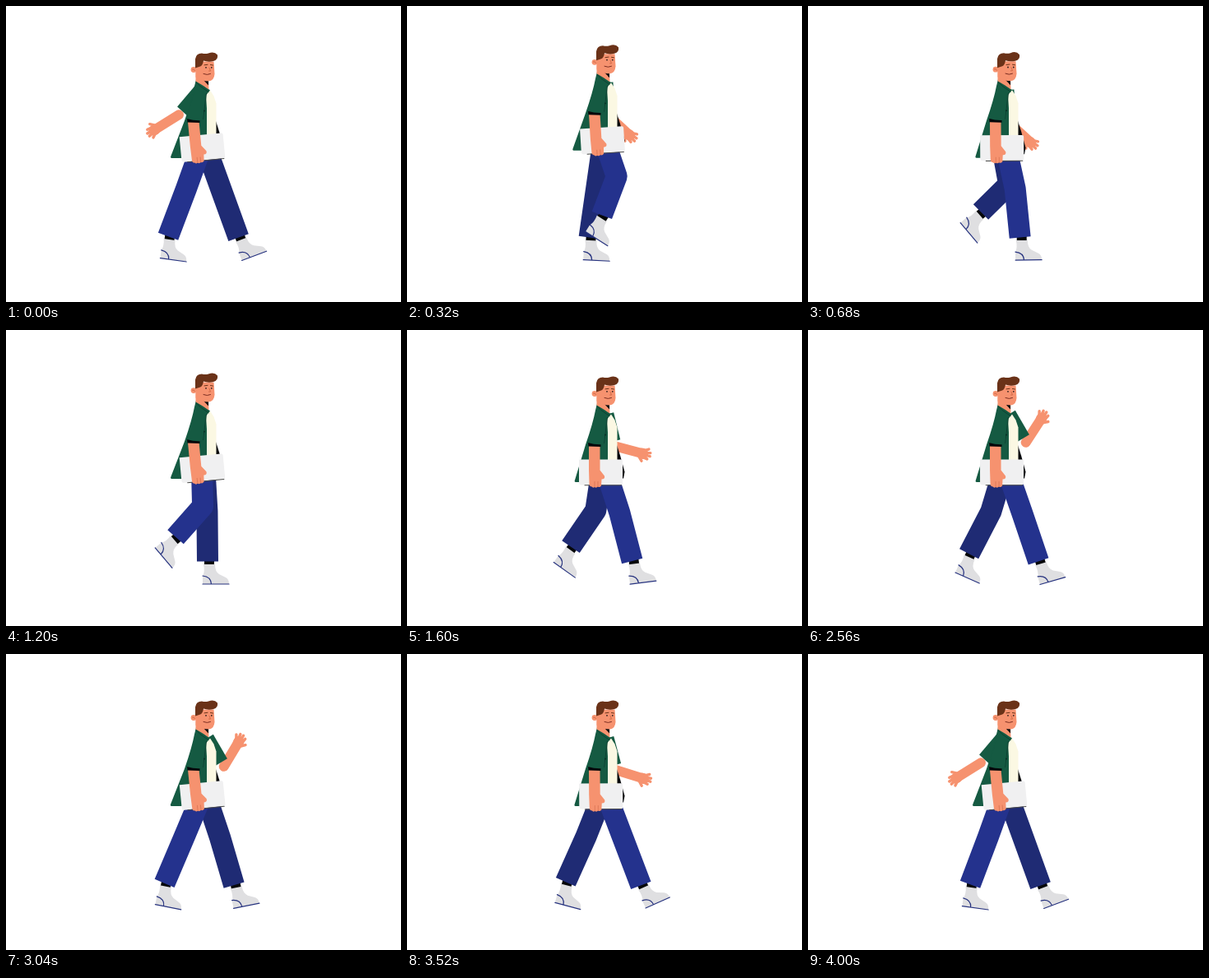
An HTML page that plays this animation: 480 px wide and 360 px high, repeating every 4.04 s.

```html
<!DOCTYPE html>
<html lang="en">
<head>
<meta charset="utf-8">
<title>Walking man</title>
<style>
  html, body { margin: 0; width: 100%; height: 100%; overflow: hidden; background: #fff; }
  svg { display: block; width: 480px; height: 360px; }
  .skin { fill: #f6926f; }
  .green { fill: #155a42; }
  .black { fill: #05070a; }
  .line { fill: none; stroke-linecap: round; stroke-linejoin: round; }
  .pants { fill: none; stroke-width: 26; stroke-linejoin: round; }
</style>
</head>
<body>
<svg viewBox="0 0 480 360">
  <defs>
    <g id="shoe">
      <path class="black" d="M2 -32H14V-22H2Z"/>
      <path fill="#dfdfe1" d="M0 0V-9Q3 -16 1 -24H15Q15 -15 20 -12L28 -8Q32 -6 32 0Z"/>
      <path class="line" stroke="#27337f" stroke-width="1.2" d="M0 -10Q10 -9 10.500 0M0 0H32"/>
    </g>
  </defs>

  <g id="foreArm" class="line" stroke="#f6926f">
    <path stroke-width="12" d="M0 0H34"/>
    <path stroke-width="13" d="M34 0H35.500"/>
    <path stroke-width="3.400" d="M36 -4L41 -7M37 -2L44 -3M37 1L44.500 1M36 4L42 5M32 5L36 9"/>
  </g>
  <path id="farSleeve" class="green" d="M0 -9L34 -8.500V8L0 9Z"/>

  <g id="farLeg"><use href="#shoe"/><polyline class="pants" stroke="#1f2b74"/></g>
  <g id="nearLeg"><use href="#shoe"/><polyline class="pants" stroke="#24328d"/></g>

  <g id="body">
    <path class="black" d="M252 130L259 152L264.500 172L263 180H248L246 140Z"/>
    <path fill="#fbf8e3" d="M241 106L248 102L252.500 109L255.500 118V162H241Z"/>
    <path id="shirt" class="green"/>
    <path class="line" stroke="#0c4131" d="M231 92L236 97L246 104M243.500 106L239.500 137"/>
    <circle cx="241" cy="127" r=".9" fill="#072c21"/>

    <path class="skin" d="M230.500 78V91L239 96L246.500 101L246 88Z"/>
    <path class="black" d="M239.500 89L246 90.500V96Z"/>
    <path class="skin" d="M231 67H252.500L253.500 82Q253 90.500 246 91Q238 91 230.500 86Z"/>
    <circle class="skin" cx="228" cy="77" r="3.400"/>
    <path class="line" stroke="#c9623f" stroke-width=".8" d="M226.500 76.500Q228.500 75.500 229.500 78M247 74.500L248.500 78.500H246.500"/>
    <path fill="#6a3218" d="M230 75V64Q231 57 238 57Q242 58 246 57Q253 54 257 59Q258 65 252 66.500Q246 68 240 66Q239 72 236 73Z"/>
    <path class="line" stroke="#6a3218" d="M241 71.300L245 70.800M248.500 71L251.500 71.500"/>
    <circle cx="243" cy="74.300" r=".9" fill="#2a1a1a"/>
    <circle cx="249.800" cy="74.300" r=".9" fill="#2a1a1a"/>
    <path class="line" stroke="#7c2e22" d="M240 82Q244.500 84 248.500 82"/>

    <g id="carry">
      <path fill="#f0f0f1" d="M209 157H260Q262 157 262 159V186Q262 188 260 188H212Q209 188 209 185Z"/>
      <path class="line" stroke="#4a4a48" d="M216 188.300H260.500"/>
      <path class="skin" d="M221 139H234.500V170L240 177Q241 181 236.500 181L236 189Q234 191.500 232 190Q230 192 228 190.500Q226 192 224.500 190Q221.500 190 221.500 186L221 170Z"/>
      <path class="line" stroke="#d46f4f" stroke-width=".7" d="M228 184V190M232 184V190"/>
    </g>
    <path class="black" d="M220 136L235.500 138V141.500L220.500 141Z"/>
    <path class="green" d="M230 100L242 106L239 138.500Q230 139.500 219.500 136.500Z"/>
  </g>
</svg>
<script>
const LOOP = 4040, STEP = 40, WALK = 1000, TAU = 2 * Math.PI;
const $ = id => document.getElementById(id);
const rad = deg => deg * Math.PI / 180;
const mix = (a, b, k) => a + (b - a) * k;
const clamp = k => Math.min(1, Math.max(0, k));
const ease = k => (1 - Math.cos(Math.PI * clamp(k))) / 2;
const wrap = t => (t + WALK) % WALK;
const place = (id, x, y, turn) =>
  $(id).setAttribute('transform', `translate(${x} ${y}) rotate(${turn})`);

// One stride of a heel from landing: part of the stride, x, y, shoe angle
const stride = [
  [0, 290, 309, -24], [.1, 266, 309, -4], [.22, 239, 309, 0], [.5, 184, 306, 9],
  [.58, 179, 295, 24], [.69, 183, 264, 50], [.84, 232, 281, 22], [.96, 284, 304, -23]
];

// Smooth curve through the stride
function heelAt(u) {
  const n = stride.length;
  const at = i => {
    const turn = Math.floor(i / n), [p, ...rest] = stride[i - turn * n];
    return [p + turn, ...rest];
  };
  let i = n - 1;
  while (stride[i][0] > u) i--;
  const [a, b, c, d] = [-1, 0, 1, 2].map(k => at(i + k));
  const span = c[0] - b[0], s = (u - b[0]) / span;
  return [1, 2, 3].map(k => {
    const m0 = (c[k] - a[k]) / (c[0] - a[0]) * span;
    const m1 = (d[k] - b[k]) / (d[0] - b[0]) * span;
    const e = c[k] - b[k];
    return b[k] + s * (m0 + s * (3 * e - 2 * m0 - m1 + s * (m0 + m1 - 2 * e)));
  });
}

// The cuff rides on the shoe; the knee bends forward as hip and cuff come closer
function poseLeg(id, age, hipX, hipY) {
  const [x, y, turn] = heelAt(age / WALK);
  const c = Math.cos(rad(turn)), s = Math.sin(rad(turn));
  const cuffX = x + 6 * c + 27.5 * s, cuffY = y + 6 * s - 27.5 * c;
  const dx = cuffX - hipX, dy = cuffY - hipY, reach = Math.hypot(dx, dy);
  const bend = .62 * Math.max(0, 107 - reach) / reach;
  const kneeX = hipX + .42 * dx + bend * dy, kneeY = hipY + .42 * dy - bend * dx;
  const [shoe, pants] = $(id).children;
  shoe.setAttribute('transform', `translate(${x} ${y}) rotate(${turn})`);
  pants.setAttribute('points', `${hipX},${hipY} ${kneeX},${kneeY} ${cuffX},${cuffY}`);
}

// Swings with the walk, and is raised to wave in the middle of the loop
function poseArm(t, bob) {
  const swing = Math.pow(ease(1 - Math.abs(1 - t % WALK / 500)), .65);
  const lift = ease((t - 1500) / 450) * (1 - ease((t - 3100) / 420));
  const upper = mix(mix(-42, 16, swing), 31, lift);
  const fore = mix(mix(-58, 73, swing), 152 - 5 * Math.cos((t - 2000) / 560 * TAU), lift);
  const x = 241 + upper * .1, y = 102 + bob;
  place('farSleeve', x, y, 90 - upper);
  place('foreArm', x + 40 * Math.sin(rad(upper)), y + 40 * Math.cos(rad(upper)), 90 - fore);
}

function draw(time) {
  const t = time % 4000;
  const farAge = wrap(t % WALK + 20), nearAge = wrap(t % WALK - 520);
  const landed = Math.min(farAge, nearAge);
  const bob = .5 - 9.5 * Math.sin(Math.PI * clamp((landed - 140) / 360)) ** 2;
  const hip = 6 * Math.cos(t / WALK * TAU);
  const sway = .5 + .5 * Math.cos((t - 100) / WALK * TAU);
  const hem = 204 - 4 * sway;

  poseArm(t, bob);
  poseLeg('farLeg', farAge, 240 + hip, 180 + bob);
  poseLeg('nearLeg', nearAge, 240 - hip, 180 + bob);
  place('body', 0, bob, 0);
  $('carry').setAttribute('transform', `rotate(${-6 * sway} 228 140)`);
  $('shirt').setAttribute('d',
    `M231 89L248 102L243 108L244 124V165L213 184.500H${hem + 1}Q${hem - 1} 184 ${hem} 182L217 139Q226 113 229 97Z`);
}

const start = performance.now();
function tick() {
  const t = (performance.now() - start) % LOOP;
  draw(Math.floor(t / STEP) * STEP);
  requestAnimationFrame(tick);
}
tick();
</script>
</body>
</html>
```
